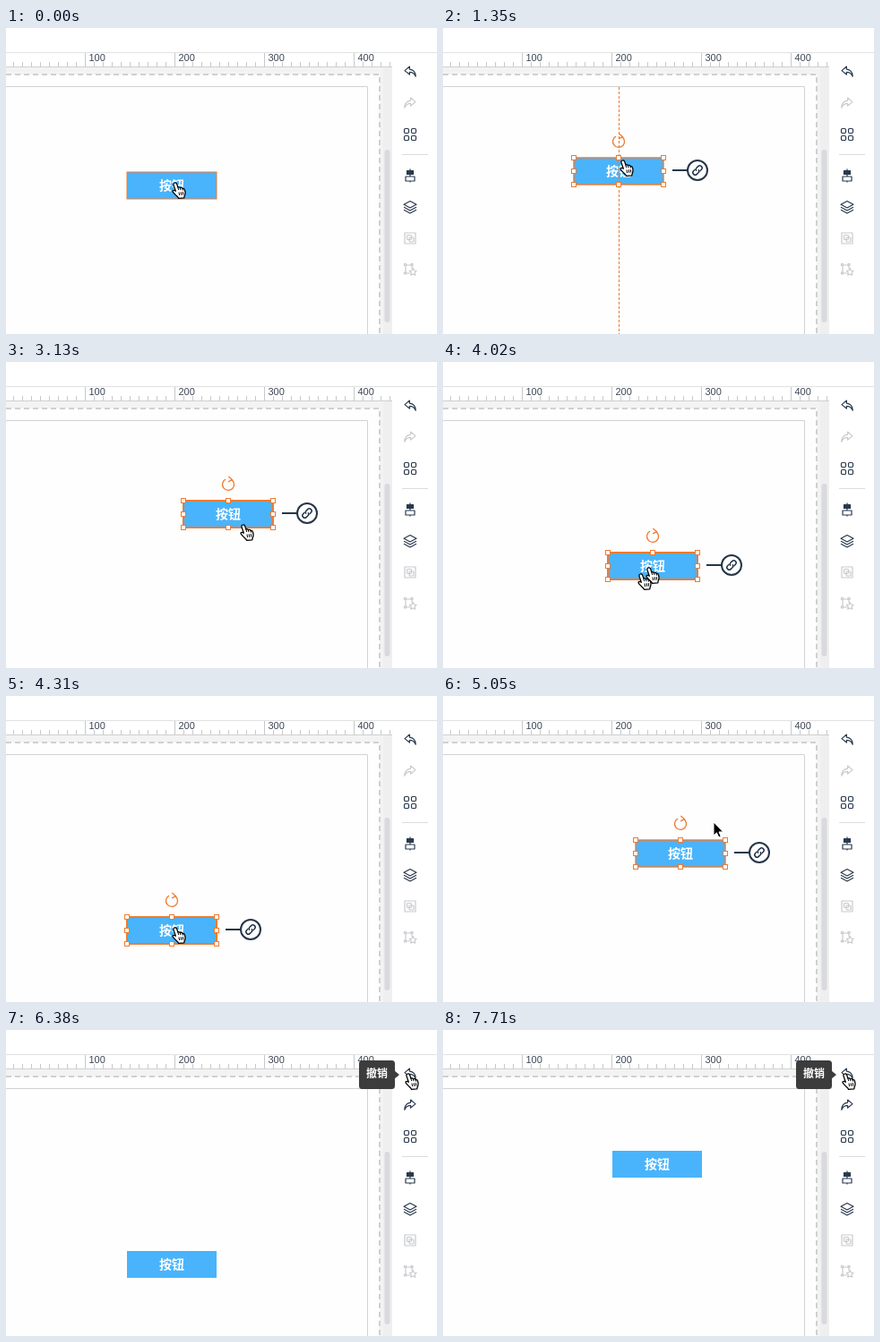
An HTML page for the animation above (8 s loop, 481 by 342 pixels).

```html
<!DOCTYPE html>
<html lang="zh">
<head>
<meta charset="utf-8">
<title>Button drag and undo</title>
<style>
  html, body { margin: 0; width: 100%; height: 100%; overflow: hidden; background: #fff; }
  svg { display: block; width: 481px; height: 342px; }
  text { font-family: "Noto Sans CJK SC", "Noto Sans CJK", sans-serif; font-weight: 700; fill: #fff; text-anchor: middle; }
  #ruler text { font: 11px "Liberation Sans", Arial, sans-serif; fill: #3c4654; text-anchor: start; }
  .icon { fill: none; stroke: #2b3a4e; stroke-width: 1.2; stroke-linejoin: round; }
  .off { stroke: #c8cacd; }
  .solid { fill: #2b3a4e; }
  .guide { stroke: #ef7a30; stroke-dasharray: 3 2; }
  .orange { fill: none; stroke: #ef7a30; }
  .link { fill: none; stroke: #26364a; }
</style>
</head>
<body>
<svg viewBox="0 0 481 342">
  <defs>
    <clipPath id="area"><rect y="44" width="431" height="298"/></clipPath>
    <path id="turn" d="M-.6-6L-6-1.4-.6 3V.4C2.8.4 4.8 1.8 6.2 5.2 6 .6 3.4-2.6-.6-2.9Z"/>
    <g id="hand">
      <path fill="#fff" stroke="#000" stroke-width="1.3" stroke-linejoin="round" d="M3.2 1C4.3.6 5.3 1.2 5.7 2.4L6.9 6C8 5.4 9 5.8 9.3 6.6 10.4 6 11.6 6.4 12 7.4 13.2 7.2 14.2 7.8 14.5 9.2L15 11.5C15.3 14 14 15 13.8 17.8L7.6 18.4C7 16.8 5.2 15.8 3.4 13.6 2.2 12.2.7 11.4 1 10.2 1.3 9.2 2.6 9.1 4.3 10.2L2 3.4C1.6 2.2 2.2 1.3 3.2 1Z"/>
      <path fill="none" stroke="#000" d="M6.9 6L7.7 9M9.3 6.6L10 9.2M12 7.4L12.5 9.6M8 11.5L8.6 15M10.2 11.3L10.7 14.8M12.3 11.1L12.6 14.5"/>
    </g>
    <path id="arrow" fill="#000" stroke="#fff" d="M0 0V15L3.4 11.8 5.8 17 8.2 16 6 10.9H10.6Z"/>
  </defs>

  <rect width="481" height="342" fill="#fff"/>
  <g clip-path="url(#area)">
    <rect y="44" width="431" height="298" fill="#f3f3f4"/>
    <rect y="52" width="417" height="290" fill="#fefefe"/>
    <path d="M0 52H417V342" fill="none" stroke="#d0d0d0" stroke-width="2" stroke-dasharray="6 4"/>
    <rect x="421" y="44" width="10" height="298" fill="#efeff0"/>
    <rect x="422.5" y="136" width="6" height="193" rx="3" fill="#d9dade"/>
    <path d="M0 65.5H403.5V342" fill="none" stroke="#d2d2d2"/>
    <g id="button">
      <rect width="100" height="30" fill="#49b4fc"/>
      <text x="50" y="20" font-size="14">按钮</text>
      <rect id="edge" class="orange" width="100" height="30"/>
    </g>
    <path id="middle" class="guide" d="M196.5 66V342"/>
    <path id="corner" class="guide" fill="none" d="M0 66.5H403.5V342"/>
    <g id="frame">
      <g id="grips" class="orange"></g>
      <path class="orange" stroke-width="1.3" d="M53.4-23.6A6.5 6.5 0 1 1 47-23.8M50.4-27L54.4-23.4 50-21.2"/>
      <path class="link" stroke-width="2" d="M110 14H127"/>
      <circle class="link" cx="138" cy="14" r="11" stroke-width="2" style="fill:#fff"/>
      <g class="link" stroke-width="1.5" stroke-linecap="round" transform="translate(138 14) rotate(-45)">
        <path d="M-1.5-2.6H-3.6A2.6 2.6 0 0 0-3.6 2.6H-1.2A2.6 2.6 0 0 0 1.2 .8"/>
        <path d="M1.5 2.6H3.6A2.6 2.6 0 0 0 3.6-2.6H1.2A2.6 2.6 0 0 0-1.2-.8"/>
      </g>
    </g>
  </g>

  <g id="ruler">
    <rect y="27" width="481" height="1" fill="#e2e2e3"/>
    <rect y="43" width="431" height="1" fill="#cfcfcf"/>
  </g>

  <g class="icon" transform="translate(451 49)"><use href="#turn"/></g>
  <g id="redo" class="icon" transform="translate(451 84) scale(-1 1)"><use href="#turn"/></g>
  <g class="icon" transform="translate(451 119)">
    <rect x="-6.5" y="-6.5" width="5" height="5" rx="1.2"/><rect x="1.5" y="-6.5" width="5" height="5" rx="1.2"/>
    <rect x="-6.5" y="1.5" width="5" height="5" rx="1.2"/><rect x="1.5" y="1.5" width="5" height="5" rx="1.2"/>
  </g>
  <rect x="442" y="141" width="29" height="1" fill="#dcdcde"/>
  <g class="icon" transform="translate(451 165)">
    <path d="M0-7.5V7.5"/>
    <rect class="solid" x="-3.5" y="-5.5" width="7" height="4"/>
    <rect x="-5" y="1" width="10" height="5" fill="#fff"/>
  </g>
  <g class="icon" transform="translate(451 200)">
    <path d="M0-6.5L7-2.8 0 1-7-2.8ZM-7 .2L0 4 7 .2M-7 3.2L0 7 7 3.2"/>
  </g>
  <g class="icon off" transform="translate(451 235)">
    <rect x="-6" y="-6" width="12" height="12"/>
    <rect x="-3.5" y="-3.5" width="5" height="5" rx="1"/>
    <rect x="-1" y="-1" width="5" height="5" rx="1"/>
  </g>
  <g class="icon off" transform="translate(451 270)">
    <path d="M-5-5H2M-5-5V4M-5 4H0M2-5V-1"/>
    <path d="M-6.5-6.5h2v2h-2zM1-6.5h2v2h-2zM-6.5 3h2v2h-2z"/>
    <path d="M3.2-1.5L4.4 1 7 1.4 5.2 3.4 5.6 6.2 3.2 5 .8 6.2 1.2 3.4-.6 1.4 2 1Z"/>
  </g>

  <g id="tip">
    <path d="M433 45L439 50 433 55Z" fill="#3c3c3c"/>
    <rect x="394" y="34" width="40" height="32" rx="3.5" fill="#3c3c3c"/>
    <text x="414" y="53" font-size="12">撤销</text>
  </g>
  <g id="cursors"><use/><use/></g>
</svg>

<script>
const LOOP = 8000;
const $ = id => document.getElementById(id);

function add(parent, name, attrs, text) {
  const el = document.createElementNS('http://www.w3.org/2000/svg', name);
  for (const key in attrs) el.setAttribute(key, attrs[key]);
  if (text) el.textContent = text;
  parent.append(el);
}

for (let x = 8; x < 431; x += 10) {
  const major = x % 100 === 88;
  const y = major ? 28 : 38;
  add($('ruler'), 'rect', { x, y, width: 1, height: 43 - y, fill: '#c6c8ca' });
  if (major) add($('ruler'), 'text', { x: x + 4.5, y: 37 }, String(x + 12));
}

for (const x of [0, 50, 100]) {
  for (const y of [0, 15, 30]) {
    if (x === 50 && y === 15) continue;
    add($('grips'), 'rect', { x: x - 2.5, y: y - 2.5, width: 5, height: 5, style: 'fill:#fff' });
  }
}

// Each step lists only what changes; mode is plain, hover, sel or hot (selected and hovered).
const steps = [
  { t: 0, at: [135, 161], mode: 'hover', cursor: 'hand', pos: [[185, 172]], guide: '', tip: false, redo: false },
  { t: 900, mode: 'hot' },
  { t: 1350, at: [146, 145], mode: 'sel', pos: [[197, 147]], guide: 'middle' },
  { t: 1490, at: [146, 135], mode: 'hot', pos: [[196, 146]], guide: '' },
  { t: 2240, pos: [[218, 146]], guide: 'middle' },
  { t: 2390, at: [187, 135], pos: [[238, 146]], guide: '' },
  { t: 2530, at: [189, 135], pos: [[239, 146]] },
  { t: 3130, at: [198, 155], pos: [[261, 181]] },
  { t: 3280, at: [222, 187], pos: [[275, 203]] },
  { t: 3420, at: [226, 193], pos: [[276, 204]] },
  { t: 4020, at: [184, 213], pos: [[217, 236], [226, 229]] },
  { t: 4160, at: [146, 240], pos: [[192, 254]], guide: 'middle' },
  { t: 4310, at: [135, 247], pos: [[185, 258]], guide: '' },
  { t: 5050, at: [215, 161], mode: 'sel', cursor: 'arrow', pos: [[302, 141]] },
  { t: 5200, at: [304, 66], mode: 'hot', cursor: 'hand', pos: [[354, 77]], guide: 'corner' },
  { t: 5340, guide: '' },
  { t: 5640, pos: [[365, 79]] },
  { t: 5790, mode: 'sel', cursor: 'arrow', pos: [[422, 55]] },
  { t: 5930, pos: [[447, 49]] },
  { t: 6080, cursor: 'hand', pos: [[445, 48]] },
  { t: 6230, tip: true },
  { t: 6380, at: [135, 247], mode: 'plain', redo: true },
  { t: 7120, at: [226, 193] },
  { t: 7710, at: [189, 135] }
];
for (let i = 1; i < steps.length; i++) steps[i] = { ...steps[i - 1], ...steps[i] };

const show = (el, on) => { el.style.display = on ? '' : 'none'; };
const place = (el, [x, y]) => el.setAttribute('transform', `translate(${x} ${y})`);
const cursors = [...$('cursors').children];
let current;

function draw(s) {
  place($('button'), s.at);
  place($('frame'), s.at);
  show($('frame'), s.mode === 'sel' || s.mode === 'hot');
  show($('edge'), s.mode !== 'plain');
  $('edge').setAttribute('stroke-width', s.mode === 'hot' ? 2 : s.mode === 'sel' ? 1.4 : 1);
  show($('middle'), s.guide === 'middle');
  show($('corner'), s.guide === 'corner');
  show($('tip'), s.tip);
  $('redo').classList.toggle('off', !s.redo);
  cursors.forEach((el, i) => {
    show(el, s.pos[i]);
    if (!s.pos[i]) return;
    el.setAttribute('href', '#' + s.cursor);
    place(el, s.pos[i]);
  });
}

const start = performance.now();
function tick() {
  const t = (performance.now() - start) % LOOP;
  const step = steps.findLast(s => s.t <= t);
  if (step !== current) draw(current = step);
  requestAnimationFrame(tick);
}
tick();
</script>
</body>
</html>
```
